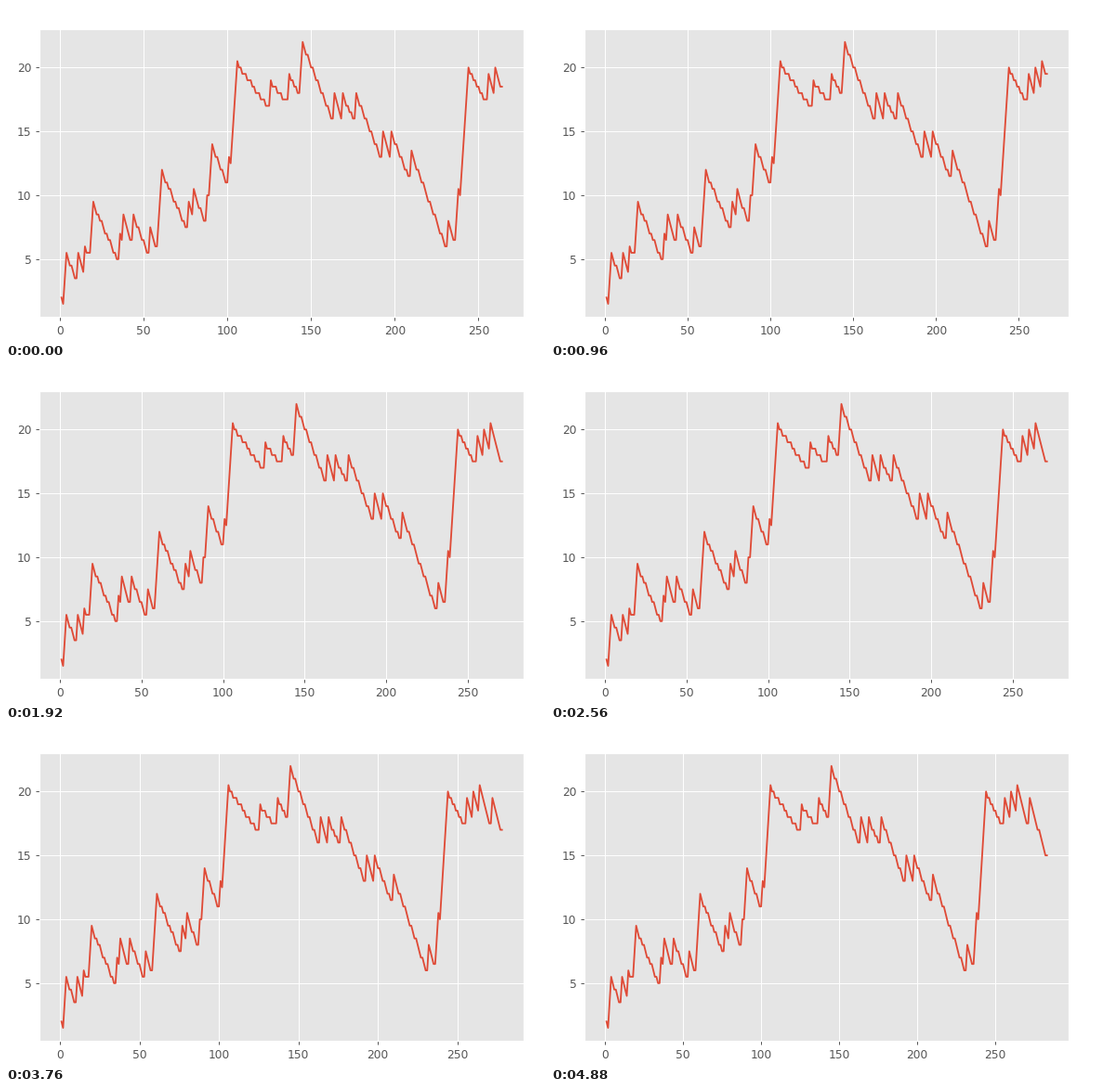
Recreate the animation shown at these times as a matplotlib script. Size 580 px wide and 360 px high, loop 5000 ms.

```python
import matplotlib.pyplot as plt
import numpy as np
from matplotlib.animation import FuncAnimation
from matplotlib.ticker import MultipleLocator

W, H, DPI = 580, 360, 88
FRAMES, INTERVAL = 125, 40
FIRST_REFRESH, REFRESH_EVERY = 9, 28
COUNTS = [264, 267, 271, 275, 278, 283]
GAIN, LOSS = 2.0, 0.5

# Key points: the peaks of the series.
PEAKS = [(4, 5.5), (11, 5.5), (15, 6), (20, 9.5), (36, 7), (38, 8.5),
         (44, 8.5), (54, 7.5), (61, 12), (77, 9.5), (80, 10.5), (88, 10),
         (91, 14), (101, 13), (106, 20.5), (126, 19), (137, 19.5), (145, 22),
         (164, 18), (169, 18), (177, 18), (193, 15), (198, 15), (210, 13.5),
         (232, 8), (238, 10.5), (244, 20), (256, 19.5), (260, 20),
         (264, 20.5), (272, 19.5), (284, 17)]


def series(start, peaks):
    """Fall from each peak in small losses, then climb to the next in gains."""
    values = [start]
    for x, y in peaks:
        last = values[-1]
        gains = max(1, int(np.ceil((y - last) / GAIN)))
        idle = x - len(values) - gains
        losses = round((last - y + GAIN * gains) / LOSS)
        for i in range(1, idle + 1):
            values.append(last - LOSS * -(-i * losses // idle))
        for i in range(gains - 1, -1, -1):
            values.append(y - GAIN * i)
    return np.array(values)


ys = series(2.0, PEAKS)
xs = np.arange(1, len(ys) + 1)

plt.style.use("ggplot")
plt.rcParams["font.family"] = "DejaVu Sans"

fig = plt.figure(figsize=(W / DPI, H / DPI), dpi=DPI, facecolor="white")
left, top, width, height = 36, 24.6, 521.4, 310.6
ax = fig.add_axes([left / W, 1 - (top + height) / H, width / W, height / H])
line, = ax.plot([], [], color="#DF4A36", lw=1.5)

ax.xaxis.set_major_locator(MultipleLocator(50))
ax.yaxis.set_major_locator(MultipleLocator(5))
margin = 0.05 * (ys.max() - ys.min())
ax.set_ylim(ys.min() - margin, ys.max() + margin)


def update(frame):
    refresh = (frame - FIRST_REFRESH) // REFRESH_EVERY + 1
    count = COUNTS[max(refresh, 0)]
    shown = ys[:count].copy()
    shown[-1] = shown[-2]  # the newest value is still pending
    line.set_data(xs[:count], shown)
    pad = 0.05 * (count - 1)
    ax.set_xlim(1 - pad, count + pad)
    return line,


anim = FuncAnimation(fig, update, frames=FRAMES, interval=INTERVAL,
                     init_func=lambda: update(0), repeat=True, repeat_delay=0)
plt.show()
```
